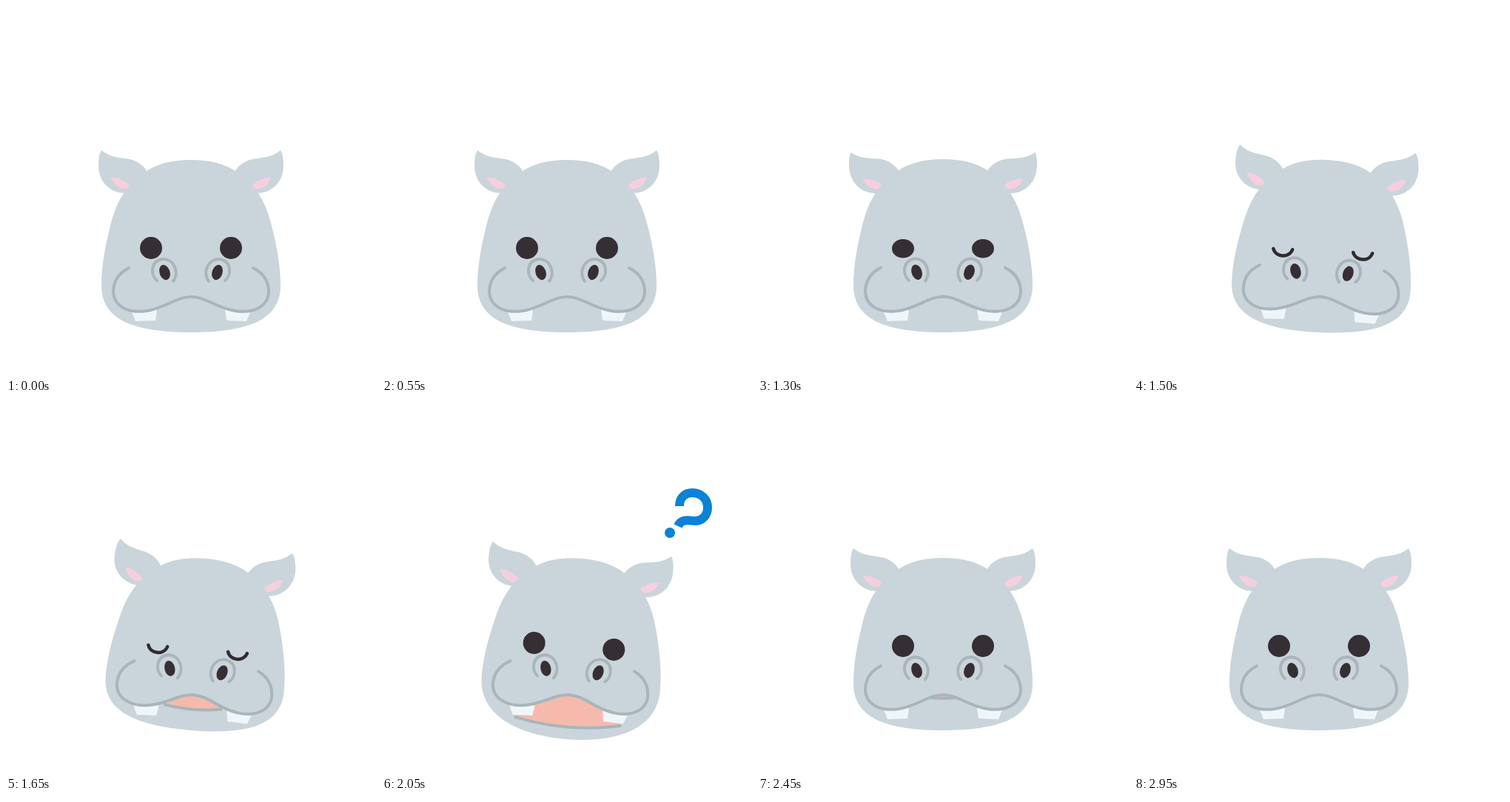
An HTML page for the animation above (3000 ms loop, 500 by 500 pixels).

```html
<!DOCTYPE html>
<html lang="en">
<head>
<meta charset="utf-8">
<title>Puzzled hippo</title>
<style>
  html, body { margin: 0; width: 100%; height: 100%; overflow: hidden; background: #fff; }
  svg { display: block; width: 100vw; height: 100vh; }
  .skin { fill: #cad5db; }
  .line { stroke: #a9b5ba; stroke-width: 4; stroke-linecap: round; }
  .dark { fill: #352e32; }
  .open { fill: none; }
</style>
</head>
<body>
<svg viewBox="0 0 500 500">
  <g id="head">
    <!-- Everything in a "half" is mirrored around x = 250. -->
    <g id="backHalf">
      <g id="ear">
        <path class="skin" d="M129 195C139 203 147 204 160 206C175 207 185 214 191 224L180 250L162 253C140 253 125 237 125 216C125 206 126 200 129 195Z"/>
        <path fill="#f6cfde" d="M142 232C151 230 164 238 169 244C165 250 149 249 142 232Z"/>
      </g>
      <path id="body" class="skin"/>
    </g>
    <use href="#backHalf" transform="matrix(-1 0 0 1 500 0)"/>
    <path id="mouth" fill="#f5baac"/>
    <path id="jaw" class="line open"/>
    <g id="faceHalf">
      <path fill="#eff6fa" d="M169 411H204L202 425L175 426Z"/>
      <path class="line skin" d="M166 354C150 362 145 375 145 387C146 405 164 416 190 412C216 408 230 393 250 393"/>
      <path class="line open" d="M204 371C195 364 195 345 211 342C227 341 235 360 226 372"/>
      <ellipse class="dark" cx="214.5" cy="360" rx="7" ry="10.5" transform="rotate(-18 214.5 360)"/>
      <ellipse id="eye" class="dark" cx="196" rx="15"/>
      <path id="lid" class="open" stroke="#302b30" stroke-width="4.5" stroke-linecap="round" d="M183 331C187 343 205 343 209 331"/>
    </g>
    <use href="#faceHalf" transform="matrix(-1 0 0 1 500 0)"/>
  </g>
  <g id="mark" fill="#0a82d6">
    <path class="open" stroke="#0a82d6" stroke-width="12" d="M402 138C402 126 410 120 419 120C432 120 440 129 440 140C440 151 432 158 424 158C415 158 405 154 400 165"/>
    <circle cx="389" cy="174" r="7"/>
  </g>
</svg>
<script>
const LOOP = 3000, STEP = 50;
const $ = id => document.getElementById(id);
const set = (id, name, value) => $(id).setAttribute(name, value);

// Smooth 0 to 1 between two times, and a rise followed by a fall.
function ease(t, from, to) {
  const p = Math.min(1, Math.max(0, (t - from) / (to - from)));
  return p * p * (3 - 2 * p);
}
const pulse = (t, rise, top, fall, end) => ease(t, rise, top) - ease(t, fall, end);

function draw(t) {
  const tilt = 4.8 * pulse(t, 1330, 1640, 2100, 2390);
  const breath = 0.004 * pulse(t, 600, 850, 1300, 1600);
  const ear = 5.5 * pulse(t, 1350, 1650, 1650, 1950) - 4.5 * pulse(t, 1150, 1300, 1300, 1500);
  const blink = pulse(t, 1250, 1450, 1800, 1920);
  const open = pulse(t, 1510, 1810, 2100, 2540);
  const mark = 1.14 * ease(t, 1780, 1900) - 0.14 * ease(t, 1900, 2000) - ease(t, 2280, 2450);

  set('head', 'transform', `rotate(${tilt} 250 440) translate(0 ${-440 * breath}) scale(1 ${1 + breath})`);
  set('ear', 'transform', `rotate(${ear} 175 240)`);

  // The chin only drops once the mouth is nearly wide open.
  const chin = 441 + 12 * Math.max(0, (open - 0.7) / 0.3);
  set('body', 'd', `M252 208H250C225 208 205 213 190 223C165 240 150 260 141 297
    C134 325 129 350 129 378C129 425 175 ${chin} 250 ${chin}H252Z`);

  const lip = 393, w = 11 + 60 * open;
  const corner = lip + 36 * open;
  const curve = `M${250 - w} ${corner}Q250 ${lip + 51 * open} ${250 + w} ${corner}`;
  set('jaw', 'd', curve);
  set('mouth', 'd', `${curve}V${lip}H${250 - w}Z`);

  const closed = blink > 0.9;
  set('eye', 'ry', closed ? 0 : 15 * (1 - blink));
  set('eye', 'cy', 327 + 8 * blink);
  set('lid', 'visibility', closed ? 'visible' : 'hidden');

  set('mark', 'transform', `translate(410 150) scale(${mark}) translate(-410 -150)`);
  set('mark', 'visibility', mark > 0 ? 'visible' : 'hidden');
}

const start = performance.now();
function tick() {
  const t = (performance.now() - start) % LOOP;
  draw(Math.floor(t / STEP) * STEP);
  requestAnimationFrame(tick);
}
tick();
</script>
</body>
</html>
```
